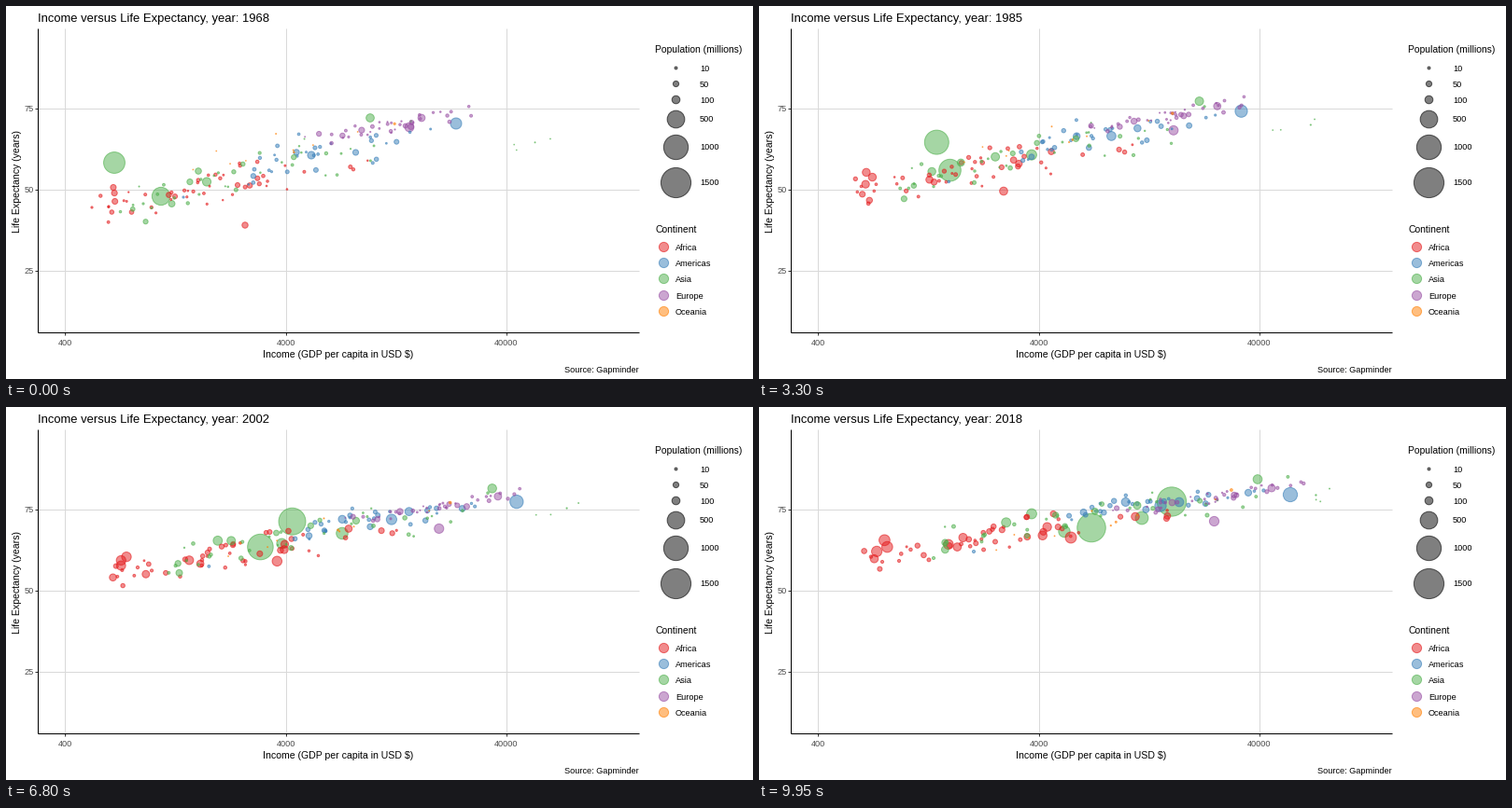
A matplotlib script that plays this animation: 800x400 px, repeating every 10 s.

```python
import numpy as np
import matplotlib.pyplot as plt
from matplotlib.animation import FuncAnimation
from matplotlib.colors import to_rgba

plt.rcParams["font.family"] = "Liberation Sans"

W, H, DPI = 800, 400, 100
FRAMES, INTERVAL = 200, 50
FIRST_YEAR, LAST_YEAR = 1968, 2018
PX = 72 / DPI  # points per pixel
LAST = FRAMES - 1
STEPS = np.arange(FRAMES)

COLORS = {"Africa": "#E41A1C", "Americas": "#377EB8", "Asia": "#4DAF4A",
          "Europe": "#984EA3", "Oceania": "#FF7F00"}
AF, AM, AS, EU, OC = COLORS

rng = np.random.default_rng(12)
xs, ys, pops, hues = [], [], [], []


def add(group, pop, pop_end, *way):
    """Store a country that visits evenly spaced stage points (x, y)."""
    keys = np.linspace(0, LAST, len(way))
    x, y = np.transpose(way)
    xs.append(np.interp(STEPS, keys, x))
    ys.append(np.interp(STEPS, keys, y))
    pops.append(np.linspace(pop, pop_end, FRAMES))
    hues.append(COLORS[group])


def cloud(group, count, start, end, growth=2, skew=1.5, typical=7):
    """Countries drifting between two sloping bands (x0, x1, y0, y1, spread)."""
    s = np.linspace(0, 1, 8)
    x0, x1, y0, y1, spread = (a + (b - a) * s for a, b in zip(start, end))
    for _ in range(count):
        rank, offset = rng.beta(1.2, skew), rng.normal()
        x = x0 + rank * (x1 - x0) + rng.normal(0, 6, s.size)
        y = y0 + rank * (y1 - y0) + offset * spread + rng.normal(0, 1.5, s.size)
        pop = np.clip(typical * rng.lognormal(0, 1.1), .2, 50)
        add(group, pop, pop * growth * rng.uniform(.8, 1.2), *zip(x, y))


def crisis(group, year, years, x, y, low):
    """A small country whose life expectancy falls to stage height low."""
    add(group, 5, 11, (x, y), (x + 40, y - 50))
    mid = (year - FIRST_YEAR) / (LAST_YEAR - FIRST_YEAR) * LAST
    pulse = np.clip(1 - abs(STEPS - mid) / (4 * years), 0, 1)
    ys[-1] += (low - ys[-1]) * pulse


# Most populous countries: millions at both ends, then start, middle, end
add(AS, 750, 1420, (116, 168), (228, 135), (442, 101.5))
add(AS, 530, 1350, (166, 204), (224, 162), (356, 129.5))
add(AS, 102, 127, (390, 120), (513, 93), (534, 77.5))
add(AS, 113, 267, (215, 188.5), (331, 145), (410, 119))
add(AS, 57, 212, (206, 177), (277, 154), (327, 133.5))
add(AS, 63, 161, (177.5, 212), (189, 160), (292, 114.5))
add(AF, 54, 196, (256, 235), (265, 180), (334, 140))
add(AF, 27, 109, (134.5, 221), (110, 202), (218.5, 140))
add(AF, 33, 98, (248, 192), (346, 138), (403, 117.5))
add(AM, 200, 327, (482, 126), (534, 106), (569, 94))
add(AM, 88, 210, (327, 160), (403, 129), (430, 106))
add(AM, 49, 126, (374.5, 157), (421, 118), (450, 102))
add(EU, 128, 144, (432, 130), (450, 135), (487.5, 122.5))
add(EU, 78, 83, (445, 120), (514, 101), (549, 87))

cloud(AF, 48, (100, 390, 213, 167, 12), (112, 460, 160, 110, 9), growth=3.3, skew=2)
cloud(AM, 30, (230, 460, 185, 124, 10), (310, 545, 117, 85, 4))
cloud(AS, 36, (135, 430, 210, 140, 11), (195, 575, 140, 88, 7), growth=2.3)
cloud(AS, 4, (500, 630, 152, 135, 4), (585, 625, 104, 80, 3), typical=.4)
cloud(EU, 37, (325, 500, 143, 112, 5), (385, 585, 112, 81, 3), growth=1.1, skew=1.2)
cloud(OC, 10, (200, 440, 178, 124, 7), (240, 550, 153, 85, 5), typical=1)

crisis(AF, 1972, 1, 110, 215, 306)
crisis(AS, 1977, 3, 147, 212, 287)
crisis(AF, 1994, 1, 92, 216, 327)
crisis(AM, 2010, 1, 190, 205, 259)

paths = np.dstack([xs, ys])  # country, frame, (x, y)


def bubble_size(pop):
    """Marker area whose radius grows with the root of the population."""
    radius = .2 + .41 * np.sqrt(pop)
    return (2 * radius * PX) ** 2


fig = plt.figure(figsize=(W / DPI, H / DPI), dpi=DPI, facecolor="white")
ax = fig.add_axes([0, 0, 1, 1])
ax.set(xlim=(0, W), ylim=(H, 0))
ax.axis("off")


def line(x, y, color="black", z=1):
    ax.plot(x, y, color=color, lw=PX, zorder=z, solid_capstyle="butt")


def text(x, y, label, size, **kw):
    return ax.text(x, y, label, fontsize=size * PX, **kw)


def bubbles(x, y, sizes, colors):
    return ax.scatter(x, y, s=sizes, linewidths=PX, zorder=3,
                      facecolors=[to_rgba(c, .5) for c in colors],
                      edgecolors=[to_rgba(c, .6) for c in colors])


# Panel
GRID, TICK, GREY = "#D9D9D9", "#333333", "#4D4D4D"
for i, label in enumerate(("400", "4000", "40000")):
    x = round(63.3 + 236.5 * i)
    line([x, x], [24, 350], GRID)
    line([x, x], [350, 353], TICK)
    text(x, 364.5, label, 9.2, ha="center", color=GREY)
for i, label in enumerate(("75", "50", "25")):
    y = 110 + 87 * i
    line([34, 678], [y, y], GRID)
    line([31, 34], [y, y], TICK)
    text(29.5, y + 3, label, 9.2, ha="right", color=GREY)
line([34, 34], [24, 350], z=2)
line([34, 678], [350, 350], z=2)

title = text(33.5, 17, "", 13)
text(355.5, 377, r"Income (GDP per capita in USD \$)", 10.5, ha="center")
text(12.5, 188, "Life Expectancy (years)", 10.5, rotation=90, ha="center", va="center")
text(678, 393, "Source: Gapminder", 9.2, ha="right")

# Legends
text(695, 50, "Population (millions)", 10.4)
for pop, y in zip((10, 50, 100, 500, 1000, 1500), (65.5, 83, 100, 120.5, 150.5, 188.5)):
    bubbles([716.5], [y], bubble_size(pop), ["black"])
    text(743, y + 4, str(pop), 9.2)
text(695, 243, "Continent", 10.4)
for i, (name, color) in enumerate(COLORS.items()):
    y = 257.5 + 17.4 * i
    bubbles([703.5], [y], (2 * 5.1 * PX) ** 2, [color])
    text(717, y + 4, name, 9.2)

sizes = bubble_size(np.array(pops))
dots = bubbles(paths[:, 0, 0], paths[:, 0, 1], sizes[:, 0], hues)


def draw(i):
    year = round(FIRST_YEAR + (LAST_YEAR - FIRST_YEAR) * i / LAST)
    title.set_text(f"Income versus Life Expectancy, year: {year}")
    dots.set_offsets(paths[:, i])
    dots.set_sizes(sizes[:, i], DPI)
    return title, dots


anim = FuncAnimation(fig, draw, frames=FRAMES, interval=INTERVAL, repeat=True, repeat_delay=0)
plt.show()
```
